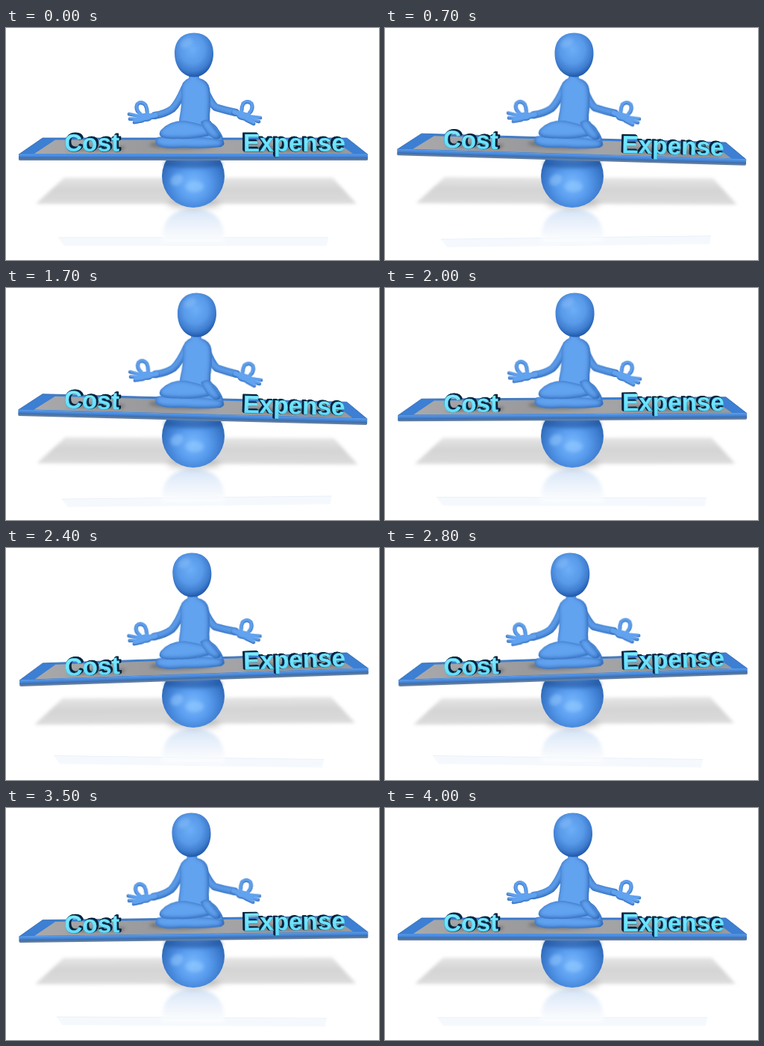
An HTML page that plays this animation: 500x310 px, repeating every 4500 ms.

```html
<!DOCTYPE html>
<html lang="en">
<head>
<meta charset="utf-8">
<title>Balance</title>
<style>
  html, body { margin: 0; width: 100%; height: 100%; overflow: hidden; background: #fff; }
  svg { display: block; width: 500px; height: 310px; }
  .word { font: bold 33.3px "Liberation Sans", Arial, sans-serif; }
  .side { fill: #0d3a60; stroke: #08233d; stroke-width: 1.2; stroke-linejoin: round; }
  .face { fill: url(#cyan); stroke: #4cc4ea; stroke-width: .5; }
  .skin { fill: #62a3f0; filter: url(#puff); }
  .limb path, path.limb { fill: none; stroke: #62a3f0; stroke-linecap: round; stroke-linejoin: round; }
  .limb { filter: url(#puff); }
  .hand { filter: url(#puffThin); }
</style>
</head>
<body>
<svg viewBox="0 0 500 310">
  <defs>
    <filter id="puff" x="-20%" y="-20%" width="140%" height="140%" color-interpolation-filters="sRGB">
      <feGaussianBlur in="SourceAlpha" stdDeviation="3.2"/>
      <feOffset dx="-.6" dy="-.9" result="soft"/>
      <feComposite in="SourceAlpha" in2="soft" operator="out" result="rim"/>
      <feFlood flood-color="#1a509f" flood-opacity=".95"/>
      <feComposite in2="rim" operator="in" result="shade"/>
      <feMerge><feMergeNode in="SourceGraphic"/><feMergeNode in="shade"/></feMerge>
    </filter>
    <filter id="puffThin" x="-20%" y="-20%" width="140%" height="140%" color-interpolation-filters="sRGB">
      <feGaussianBlur in="SourceAlpha" stdDeviation="1.2"/>
      <feOffset dx="-.4" dy="-.6" result="soft"/>
      <feComposite in="SourceAlpha" in2="soft" operator="out" result="rim"/>
      <feFlood flood-color="#1a509f" flood-opacity=".9"/>
      <feComposite in2="rim" operator="in" result="shade"/>
      <feMerge><feMergeNode in="SourceGraphic"/><feMergeNode in="shade"/></feMerge>
    </filter>
    <filter id="blur2" x="-20%" y="-50%" width="140%" height="200%"><feGaussianBlur stdDeviation="2"/></filter>
    <filter id="blur4" x="-50%" y="-80%" width="200%" height="260%"><feGaussianBlur stdDeviation="4"/></filter>
    <radialGradient id="headFill" cx=".46" cy=".38" r=".62">
      <stop offset="0" stop-color="#6caef7"/><stop offset=".5" stop-color="#599ae9"/>
      <stop offset=".8" stop-color="#3f7dcf"/><stop offset="1" stop-color="#1f58a9"/>
    </radialGradient>
    <radialGradient id="ballFill" cx=".5" cy=".63" r=".66">
      <stop offset="0" stop-color="#7cbafc"/><stop offset=".35" stop-color="#5c9ff0"/>
      <stop offset=".62" stop-color="#4282d6"/><stop offset="1" stop-color="#1f559f"/>
    </radialGradient>
    <linearGradient id="front" x2="0" y2="1">
      <stop offset="0" stop-color="#5a9ceb"/><stop offset=".45" stop-color="#417fcf"/>
      <stop offset=".6" stop-color="#3f6ea9"/><stop offset="1" stop-color="#71859f"/>
    </linearGradient>
    <linearGradient id="deck">
      <stop offset="0" stop-color="#a9a9ab"/><stop offset=".36" stop-color="#9a9a9c"/>
      <stop offset=".6" stop-color="#a4a4a6"/><stop offset="1" stop-color="#989a9d"/>
    </linearGradient>
    <linearGradient id="cyan" x2="0" y2="1">
      <stop offset="0" stop-color="#84f0ff"/><stop offset="1" stop-color="#5cd8fa"/>
    </linearGradient>
    <linearGradient id="floor" x2="0" y2="1">
      <stop offset="0" stop-color="#e6e6e6"/><stop offset=".45" stop-color="#d4d4d4"/>
      <stop offset="1" stop-color="#dcdcdc"/>
    </linearGradient>
    <linearGradient id="mirror" x2="0" y2="1">
      <stop offset="0" stop-color="#c8dcf6"/><stop offset=".5" stop-color="#e6effa"/>
      <stop offset="1" stop-color="#fff"/>
    </linearGradient>
  </defs>

  <path id="shadow" d="M78 200H438L470 235H40Z" fill="url(#floor)" filter="url(#blur2)"/>
  <g id="reflection">
    <path d="M70 280H432L430 291H78Z" fill="#f5f9fd"/>
    <path d="M70 280H432" stroke="#ebf1f9"/>
  </g>
  <path d="M209 286Q207 243 251 241Q295 243 293 286Z" fill="url(#mirror)" filter="url(#blur2)" opacity=".75"/>
  <ellipse cx="252" cy="235" rx="36" ry="6" fill="#777" opacity=".4" filter="url(#blur4)"/>

  <circle cx="251" cy="198" r="42" fill="url(#ballFill)"/>
  <ellipse cx="229" cy="203" rx="9" ry="7" transform="rotate(-35 229 203)" fill="#8fc4fb" opacity=".6" filter="url(#blur2)"/>
  <ellipse cx="253" cy="212" rx="12" ry="7" fill="#8fc8ff" opacity=".6" filter="url(#blur2)"/>
  <path d="M214 177H288L291 184Q251 191 211 184Z" fill="#1b4b91" opacity=".45" filter="url(#blur2)"/>

  <g id="board">
    <path d="M17 169L49 147H457L485 169Z" fill="#3c7fd3"/>
    <path d="M17 169L49 147H457L485 169" fill="none" stroke="#2b64ae" stroke-width=".8"/>
    <path d="M38 168L66 149.5H439L465 168Z" fill="url(#deck)"/>
    <path d="M17 168.5H485V175.5Q485 177 483 177H19Q17 177 17 175.5Z" fill="url(#front)"/>
    <ellipse cx="238" cy="156" rx="46" ry="6" fill="#555" opacity=".5" filter="url(#blur2)"/>
    <path d="M80 164H156L160 158H98ZM320 165H452L442 158H318Z" fill="#444" opacity=".4" filter="url(#blur2)"/>

    <path class="skin" d="M258 122Q278 123 285 136Q294 148 291 156Q283 161 270 157L252 140Z"/>
    <g id="torso">
      <path class="limb" d="M239 81Q231 100 223 108Q213 115 199 117" stroke-width="10"/>
      <path class="limb" d="M266 81Q274 100 281 106Q294 110 308 113" stroke-width="10"/>
      <path class="skin" d="M246 58H258L259 67Q271 70 273 81Q275 99 273 116Q274 134 268 140H236Q230 132 233 117Q236 103 235 82Q235 71 245 67Z"/>
      <path d="M252 6.5C269 6.5 278.5 18 278 35C277.5 53 266 65.500 252 65.500C238 65.500 226.500 53 226 35C225.500 18 235 6.500 252 6.500Z" fill="url(#headFill)"/>
      <ellipse cx="242" cy="20" rx="9" ry="6" transform="rotate(-30 242 20)" fill="#96c6fb" opacity=".4" filter="url(#blur2)"/>

      <g class="hand limb">
        <path d="M201 117L190 119" stroke-width="8"/>
        <path d="M190 119L182 120" stroke-width="11"/>
        <path d="M182 119L165 115" stroke-width="4.500"/>
        <path d="M182 122L166 121.500" stroke-width="4.500"/>
        <path d="M183 124L172 126" stroke-width="4.500"/>
        <path d="M180 115Q173 109 176 102Q181 97 187 103Q190 109 189 116" stroke-width="5"/>
      </g>
      <g class="hand limb">
        <path d="M306 113L315 116" stroke-width="8"/>
        <path d="M315 117L323 119" stroke-width="11"/>
        <path d="M324 118L341 120" stroke-width="4.500"/>
        <path d="M324 121L339 125" stroke-width="4.500"/>
        <path d="M322 123L332 128" stroke-width="4.500"/>
        <path d="M326 114Q332 108 329 101Q324 96 318 101Q315 107 316 115" stroke-width="5"/>
      </g>
    </g>
    <path class="skin" d="M203 146Q222 142 250 146Q280 146 291 151Q295 156 288 159Q262 162 238 160Q208 163 201 155Q199 149 203 146Z"/>
    <path class="skin" d="M208 136Q220 123 240 124Q262 128 274 133Q279 140 271 144Q250 149 230 148Q209 149 206 143Q205 139 208 136Z"/>
    <path class="skin" d="M261 126Q267 120 274 124Q280 134 288 144Q287 150 279 148Q266 141 261 126Z"/>

    <g id="words" class="word"></g>
  </g>
</svg>
<script>
  const el = id => document.getElementById(id);
  const NS = 'http://www.w3.org/2000/svg';

  function word(text, x, y, lean) {
    for (let depth = 4; depth >= 0; depth--) {
      const node = document.createElementNS(NS, 'text');
      node.setAttribute('x', x + lean * depth * .6);
      node.setAttribute('y', y - depth * .4);
      node.setAttribute('class', depth ? 'side' : 'face');
      node.textContent = text;
      if (depth) node.setAttribute('aria-hidden', 'true');
      el('words').append(node);
    }
  }
  word('Cost', 78, 165, 1);
  word('Expense', 318, 165, -1);

  // Board sway in 100 ms steps; the torso follows two steps later.
  const keys = [[0, 0], [8, 1], [14, 1], [23, -1], [30, -1], [37, 0], [39, 0]];
  const LOOP = 4500, LAG = 2, MAX_TILT = 1.95;

  function sway(step) {
    if (step <= 0) return 0;
    const i = keys.findIndex(k => step <= k[0]);
    const [t0, v0] = keys[i - 1], [t1, v1] = keys[i];
    return v0 + (v1 - v0) * (1 - Math.cos(Math.PI * (step - t0) / (t1 - t0))) / 2;
  }

  const move = (id, dx, angle, cx, cy) =>
    el(id).setAttribute('transform', `translate(${dx} 0) rotate(${angle} ${cx} ${cy})`);

  const start = performance.now();
  function draw() {
    const ms = (performance.now() - start) % LOOP;
    const step = Math.min(39, Math.max(0, Math.floor(ms / 100) - 1));
    const s = sway(step), lean = sway(step - LAG) - s;
    move('board', -s, s * MAX_TILT, 251, 173);
    move('torso', lean, lean * MAX_TILT, 251, 145);
    move('shadow', s * 2, s * .3, 251, 220);
    move('reflection', s * 6, -s * .8, 251, 286);
    requestAnimationFrame(draw);
  }
  draw();
</script>
</body>
</html>
```
